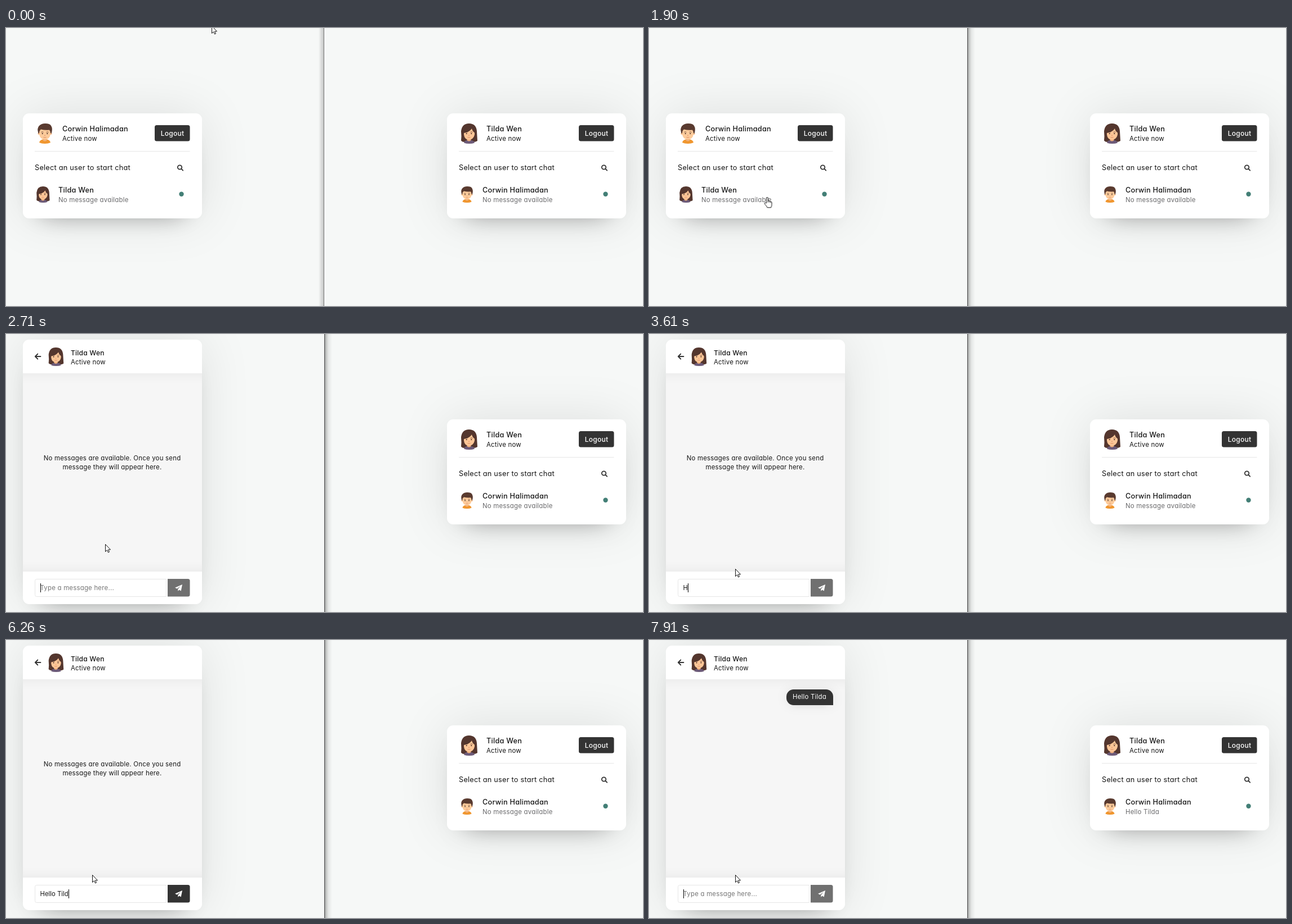
These frames come from a looping animation (1131 by 495 pixels, 8 s). An HTML page:

```html
<!DOCTYPE html>
<html lang="en">
<head>
<meta charset="utf-8">
<title>Chat</title>
<style>
* { box-sizing: border-box; letter-spacing: .02em; }
html, body { margin: 0; width: 100%; height: 100%; overflow: hidden; }
body {
  position: relative; background: #f6f8f7; color: #151515;
  font: 400 11.4px Inter, "Open Sans", sans-serif;
  font-feature-settings: "cv11";
}
div, body > svg, .card > svg { position: absolute; }
svg { overflow: visible; display: block; }
.card > svg { inset: 0; fill: #151515; }

.card {
  background: #fff; border-radius: 11px; width: 318px;
  box-shadow: 0 0 90px rgba(0,0,0,.1), 0 22.6px 45px -34px rgba(0,0,0,.5);
}
.list { top: 152px; height: 187px; }
.chat { left: 30px; top: 10px; height: 471px; }
.name { font-size: 12.7px; font-weight: 500; }
.prompt { font-size: 12.7px; }
.soft { fill: #6a6a6c; }
.btn { font-size: 12px; font-weight: 500; fill: #fff; }
.mid { text-anchor: middle; }
.line { fill: none; stroke: #333; stroke-width: 1.8; stroke-linecap: round; stroke-linejoin: round; }

.area {
  left: 0; right: 0; top: 60px; height: 353px; background: #f6f6f6;
  box-shadow: inset 0 22.6px 22.6px -22.6px rgba(0,0,0,.07), inset 0 -22.6px 22.6px -22.6px rgba(0,0,0,.07);
}
.bubble {
  right: 21.5px; top: 78px; height: 28px; padding: 0 11.5px; line-height: 27px;
  color: #fff; background: #333; border-radius: 12.7px 12.7px 0 12.7px; white-space: nowrap;
  box-shadow: 0 0 22.6px rgba(0,0,0,.08), 0 11.3px 11.3px -11.3px rgba(0,0,0,.1);
}
.field {
  left: 21px; top: 426px; width: 234px; height: 32px;
  border: 1px solid #e6e6e6; border-radius: 3.5px 0 0 3.5px; background: #fff;
}
.field div { left: 8.5px; top: 0; line-height: 30px; white-space: pre; }
.field .ghost { color: #757575; }
.entry { display: flex; align-items: center; height: 30px; }
.entry i { font-style: normal; font-size: 0; letter-spacing: 0; animation: key 8s step-end var(--t) infinite; }
.entry b { width: 1px; height: 16px; background: #000; }
.edge { top: 0; bottom: 0; }
.edge.near { left: 555px; width: 10px; border-right: 1px solid #777; background: linear-gradient(90deg, transparent, rgba(0,0,0,.2)); }
.edge.far { left: 565px; width: 14px; border-left: 1px solid #555; background: linear-gradient(90deg, rgba(0,0,0,.4), rgba(0,0,0,.22) 15%, rgba(0,0,0,.07) 50%, transparent); }

/* Everything switches in hard steps on one 8 s clock */
.a { animation: 8s step-end infinite; }
.near { animation-name: near; }
.far { animation-name: far; }
.first { animation-name: first; }
.chat { animation-name: chat; }
.hint { animation-name: hint; }
.ghost { animation-name: ghost; }
.entry { animation-name: entry; }
.caret { animation-name: caret; }
.send { animation-name: send; }
.bubble { animation-name: bubble; }
.before { animation-name: before; }
.after { animation-name: after; }
.pointer { animation-name: move; }
.arrow { animation-name: arrow; }
.hand { animation-name: hand; }
@keyframes near { 0% { opacity: 1 } 20%, 100% { opacity: 0 } }
@keyframes far { 0% { opacity: 0 } 20%, 100% { opacity: 1 } }
@keyframes first { 0% { opacity: 1 } 26.375%, 100% { opacity: 0 } }
@keyframes chat { 0% { opacity: 0 } 26.375%, 100% { opacity: 1 } }
@keyframes hint { 0%, 96.875%, 100% { opacity: 0 } 32% { opacity: 1 } }
@keyframes ghost { 0%, 92.875%, 100% { opacity: 1 } 45.125% { opacity: 0 } }
@keyframes entry { 0%, 92.875%, 100% { font-size: 0 } 45.125% { font-size: 11.3px } }
@keyframes key { 0% { font-size: 1em } 50%, 100% { font-size: 0 } }
@keyframes caret { 0%, 39.625%, 92.875%, 100% { opacity: 1 } 34%, 87.625% { opacity: 0 } }
@keyframes send {
  0%, 96.875%, 100% { fill: #707070 }
  46.875%, 94.875% { fill: #525252 }
  48.75% { fill: #333 }
}
@keyframes bubble { 0% { opacity: 0 } 96.875%, 100% { opacity: 1 } }
@keyframes before { 0% { opacity: 1 } 98.875%, 100% { opacity: 0 } }
@keyframes after { 0% { opacity: 0 } 98.875%, 100% { opacity: 1 } }
@keyframes arrow { 0%, 30.125%, 100% { opacity: 1 } 14.5% { opacity: 0 } }
@keyframes hand { 0%, 30.125%, 100% { opacity: 0 } 14.5% { opacity: 1 } }
@keyframes move {
  0% { transform: translate(365px, -4px) }
  7.125% { transform: translate(357px, 20px) }
  9% { transform: translate(330px, 92px) }
  10.875% { transform: translate(286px, 184px) }
  12.625% { transform: translate(243px, 258px) }
  14.5% { transform: translate(213px, 294px) }
  16.375% { transform: translate(204.5px, 301px) }
  30.125% { transform: translate(198px, 330px) }
  32% { transform: translate(176px, 374px) }
  34% { transform: translate(158px, 409px) }
  35.875%, 100% { transform: translate(153px, 418px) }
}
</style>
</head>
<body>

<svg width="0" height="0">
  <defs>
    <symbol id="boy" viewBox="0 0 36 36">
      <path fill="#f0962e" d="M8 34q1-4.500 6-5.500h8q5 1 6 5.500-4 2-10 2T8 34z"/>
      <path fill="#f0b07c" d="M14.500 25h7v5q-3.500 3-7 0z"/>
      <circle cx="7.500" cy="18" r="2" fill="#f5b885"/>
      <circle cx="28.500" cy="18" r="2" fill="#f5b885"/>
      <path fill="#fdcb9b" d="M8 9h20v10q-1 9-10 9.500-9-.5-10-9.500z"/>
      <path fill="#593a2f" d="M6.500 18Q3.500 8 8 4q4-4 10.500-4Q27 0 29 4q3.500 5 .500 14l-1.500-1q0-3-2-5.500-8 1-15-1-3 2-3 6.500z"/>
      <use href="#face"/>
    </symbol>
    <symbol id="girl" viewBox="0 0 36 36">
      <path fill="#54362e" d="M18 0Q31 0 32 14q.5 9 1 17-3 2-7 2H10q-4 0-6-2.500Q5 23 4 14 5.500 0 18 0z"/>
      <path fill="#6c5a78" d="M9 34.500q1-4 6-5h6q6 1 7 5-4 1.500-9.500 1.500T9 34.500z"/>
      <path fill="#f0b07c" d="M14.500 25h7v5q-3.500 3-7 0z"/>
      <path fill="#fdc697" d="M9 17q10-1.500 14-8 1 5 5 7.500v3.500Q26 28.500 18 29q-8-.5-9-9z"/>
      <use href="#face"/>
    </symbol>
    <g id="face">
      <path d="M11.500 15.500q2-1 4 0M20.500 15.500q2-1 4 0" fill="none" stroke="#593a2f" stroke-width=".8"/>
      <circle cx="13.700" cy="18" r="1.100" fill="#402a24"/>
      <circle cx="22.300" cy="18" r="1.100" fill="#402a24"/>
      <path d="M17 21q1 .7 2 0M15.500 24.500q2.500 1.300 5 0" fill="none" stroke="#d8855e" stroke-width=".9"/>
    </g>
    <g id="panel">
      <text x="70" y="49">Active now</text>
      <rect x="234" y="21" width="62.500" height="28.500" rx="3.500" fill="#333"/>
      <text class="btn mid" x="265.500" y="40">Logout</text>
      <path d="M21 67.500H296.500" stroke="#e6e6e6"/>
      <text class="prompt" x="21" y="101">Select an user to start chat</text>
      <circle class="line" cx="278.500" cy="96" r="3.700"/>
      <path class="line" d="M281.500 99l2.700 2.700"/>
      <circle cx="281.500" cy="143.800" r="4.200" fill="#437f76"/>
    </g>
  </defs>
</svg>

<div class="card list first a" style="left:30px">
  <svg width="318" height="187">
    <use href="#panel"/>
    <use href="#boy" x="21" y="18" width="36" height="36"/>
    <text class="name" x="70" y="31.500">Corwin Halimadan</text>
    <use href="#girl" x="21" y="130" width="29" height="29"/>
    <text class="name" x="63" y="140.500">Tilda Wen</text>
    <text class="soft" x="63" y="158">No message available</text>
  </svg>
</div>

<div class="card list" style="left:783px">
  <svg width="318" height="187">
    <use href="#panel"/>
    <use href="#girl" x="21" y="18" width="36" height="36"/>
    <text class="name" x="70" y="31.500">Tilda Wen</text>
    <use href="#boy" x="21" y="130" width="29" height="29"/>
    <text class="name" x="63" y="140.500">Corwin Halimadan</text>
    <text class="soft before a" x="63" y="158">No message available</text>
    <text class="soft after a" x="63" y="158">Hello Tilda</text>
  </svg>
</div>

<div class="card chat a">
  <div class="area"></div>
  <svg width="318" height="471">
    <path class="line" d="M31.500 30H22M26.300 25.500L21.800 30l4.500 4.500"/>
    <use href="#girl" x="42" y="14" width="33" height="33"/>
    <text class="name" style="font-size:12px" x="85" y="27.500">Tilda Wen</text>
    <text x="85" y="43.800">Active now</text>
    <g class="hint mid a">
      <text x="158.500" y="214.500">No messages are available. Once you send</text>
      <text x="158.500" y="230.800">message they will appear here.</text>
    </g>
    <path class="send a" d="M257 426h36q3.500 0 3.500 3.500v24.500q0 3.500-3.500 3.500h-36z"/>
    <path fill="#fff" d="M283 436l-13 5.700 3.800 1.700 6.200-4.800-4.700 5.700v3.500l2.200-2.300 3.200 2z"/>
  </svg>
  <div class="bubble a">Hello Tilda</div>
  <div class="field">
    <div class="ghost a">Type a message here...</div>
    <div class="entry a"><i style="--t:3.61s">H</i><i style="--t:3.9s">e</i><i style="--t:4.36s">l</i><i style="--t:4.5s">l</i><i style="--t:4.64s">o</i><i style="--t:4.95s"> </i><i style="--t:5.37s">T</i><i style="--t:5.95s">i</i><i style="--t:6.1s">l</i><i style="--t:6.26s">d</i><i style="--t:6.41s">a</i><b class="caret a"></b></div>
  </div>
</div>

<div class="edge near a"></div>
<div class="edge far a"></div>

<svg class="pointer a" style="left:0;top:0" width="14" height="20" fill="#fff" stroke="#111" stroke-linejoin="round">
  <path class="arrow a" d="M.5.5v13l3-2.800 2 4.300 2-1-2-4h4z"/>
  <g class="hand a">
    <path d="M4 11V2a1.500 1.500 0 0 1 3 0v5q1.500-1 2.500.500 1.500-.5 2 .800 2-.3 2 1.500v4q0 2-1.500 5H5.500Q4.500 16 1 12.500 0 10.500 1.500 10q1.200 0 2.500 1z"/>
    <path d="M7 7v2.500M9.500 7.500v2M11.500 8.500v1.500" fill="none"/>
  </g>
</svg>

</body>
</html>
```
